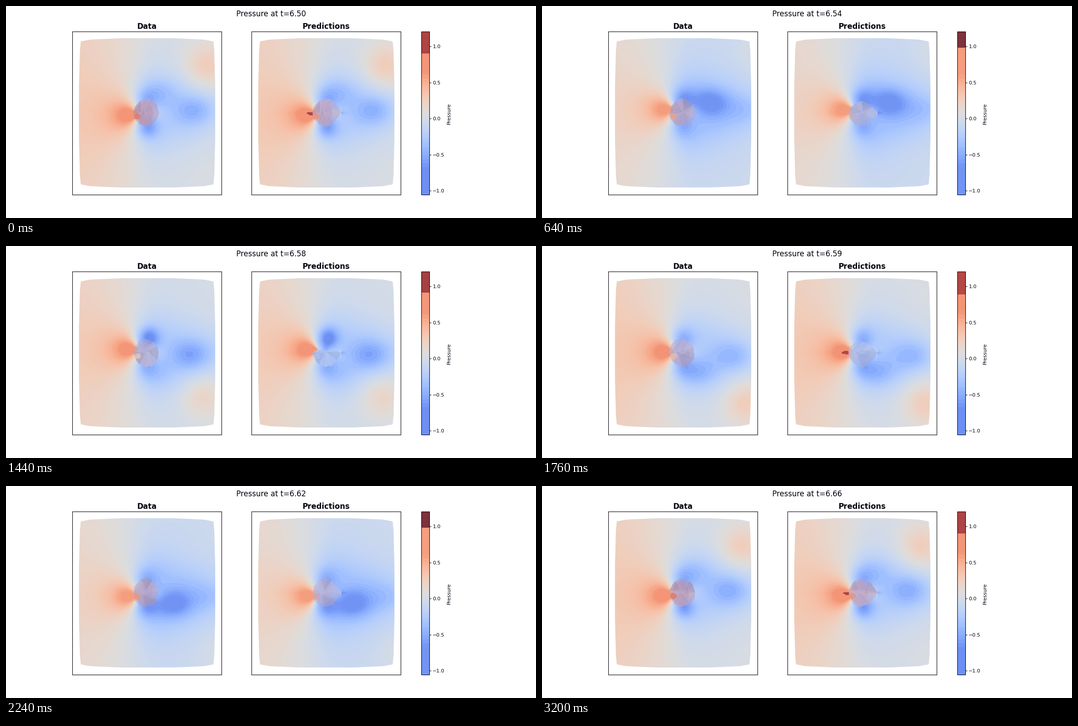
Animation, 1183 px wide and 473 px high, one loop 3.36 s. Source, as a matplotlib script:

```python
import numpy as np
import matplotlib.pyplot as plt
from matplotlib.animation import FuncAnimation
from matplotlib.colors import ListedColormap, to_rgb
from matplotlib.patches import Polygon

W, H, DPI = 1183, 473, 100
FRAMES, INTERVAL = 21, 160
VMIN, VMAX = -1.054, 1.208
PERIOD = 20.2          # frames per vortex shedding cycle
CX, CY = 313, 239      # cylinder centre
INK = "#08000f"

X, Y = np.meshgrid(np.arange(162, 469) + .5, np.arange(71, 407) + .5)
DX, DY = X - CX, Y - CY


def bump(x, centre, width):
    return np.exp(-((x - centre) / width)**2)


def mix(a, b, t):
    return (1 - t) * np.array(to_rgb(a)) + t * np.array(to_rgb(b))


def outline():
    """Mesh border: one quarter mirrored about both axes."""
    quarter = np.array([(60, 166.5), (127, 163.5), (148, 159.5), (150, 139), (152, 60)])
    right = np.vstack([quarter, quarter[::-1] * (1, -1)])
    return np.vstack([right, right[::-1] * (-1, 1)]) + (315, 238.5)


def make_cmap(i):
    """Coolwarm in coarse steps, with flat ends that drift twice per cycle."""
    u = (i - 2) % (PERIOD / 2) / (PERIOD / 2)
    rows = np.arange(57, 421)
    level = (421 - np.where(np.abs(rows - 240) > 65, rows // 9 * 9 + 4, rows)) / 364
    hot_edge = 155 - 14 * u
    cold_edge = 355 + 8 * u + 38 * bump(u, .45, .13)
    level = np.clip(level, (421 - cold_edge) / 364, (421 - hot_edge) / 364)
    colours = plt.get_cmap("coolwarm")(level)
    colours[rows < 88 + 22 * u, :3] = mix("#6e2d3a", "#be4a48", u)
    return ListedColormap(colours[::-1])


def steady():
    """Part of the pressure that does not change during the cycle."""
    r2 = DX**2 + DY**2 + 1
    drift = .09 - .10 * np.tanh((DX + 60) / 80)
    sides = -.40 * DY**2 / r2 / (1 + r2 / 65**2)
    sides *= .5 * (1 + np.tanh((DX + 14) / 25))
    wake = -.27 * np.exp(-((DX - 70) / 90)**2 - (DY / 65)**2)
    return drift + sides + wake


STEADY = steady()


def blob(y, cx, cy, sx, sy):
    return np.exp(-((X - cx) / sx)**2 - ((y - cy) / sy)**2)


def shed(age, y):
    """Vortex, trailing ridge and suction peak from one side of the cylinder."""
    total = np.zeros_like(X)
    age %= PERIOD
    for a in (age - PERIOD, age):
        strength = .48 * bump(a, 5, max(5 + .25 * a, 2))
        vx, vy = 343 + 7.9 * a, 218 + 30 * np.tanh((a - 4.3) / 4)
        total -= strength * (.85 * blob(y, vx, vy, 42, 31) + .15 * blob(y, vx, vy, 95, 80))
        total += .27 * bump(a, .3, 3.2) * blob(y, 446 + 8 * a, 135 - 7 * a, 48, 48)
    gap = (age - 7.5 + PERIOD / 2) % PERIOD - PERIOD / 2
    peak = bump(gap, 0, 2.7)
    return total - (.12 + .42 * peak) * blob(y, 310 + 12 * peak, 205, 22, 22)


def pressure(i):
    level = .06 * np.cos(4 * np.pi * (i - .5) / PERIOD)
    y0 = CY - 11 * np.sin(2 * np.pi * (i - 1.5) / PERIOD)
    cosine = np.maximum(297 - X, 0) / np.hypot(297 - X, Y - y0)
    front = .85 * cosine**1.5 / (1 + ((X - 283)**2 + (Y - y0)**2) / 42**2)
    return STEADY + level + front + shed(i, Y) + shed(i + PERIOD / 2, 2 * CY - Y)


def predicted(p):
    """Adds the kinks along the centre line at the nose and tail."""
    nose = np.maximum(284 - X, 0)
    off = np.abs(Y - 239)
    streak = .25 * np.exp(-nose / 10 - off / 2.5) + .04 * np.exp(-nose / 80 - off / 5)
    kink = np.where(X > 349, -.32, .25) * np.exp(-np.abs(X - 349) / 7 - off / 3)
    return p + np.where(X < 285, streak, 0) + kink


def ring(rng, cx, cy, rx, ry, n, jitter):
    ang = np.linspace(0, 2 * np.pi, n, endpoint=False) + rng.uniform(-.15, .15, n)
    rad = 1 + rng.uniform(-jitter, jitter, n)
    return np.column_stack([cx + rx * rad * np.cos(ang), cy + ry * rad * np.sin(ang)])


class Panel:
    def __init__(self, ax, title, is_model):
        self.ax, self.is_model = ax, is_model
        ax.set_title(title, fontsize=12, fontweight="bold", pad=4.3, color=INK)
        self.image = ax.imshow(X * 0, extent=(162, 469, 407, 71), aspect="auto",
                               vmin=VMIN, vmax=VMAX, interpolation="nearest")
        ax.set(xlim=(147.9, 481.3), ylim=(421, 56.8), xticks=[], yticks=[])
        self.image.set_clip_path(Polygon(outline(), transform=ax.transData))
        self.shapes = [ax.add_patch(Polygon([(0, 0), (1, 0), (0, 1)], lw=0))
                       for _ in range(8)]

    def draw(self, i, p, cmap):
        self.image.set_data(predicted(p) if self.is_model else p)
        self.image.set_cmap(cmap)
        self.draw_cylinder(i)

    def draw_cylinder(self, i):
        rng = np.random.default_rng(40 + i)
        rosy = .5 + .5 * np.cos(2 * np.pi * (i + 1.5) / PERIOD)
        if self.is_model:
            core, spot_colour = mix("#a6bcf0", "#be9fbb", rosy), mix("#aebfef", "#e39684", rosy)
            lift = bump(i, 7.5, 2.8)
        else:
            core, spot_colour = mix("#b2aad0", "#b894b0", rosy), mix("#e8c4b0", "#dd7a68", rosy)
            lift = 0
        hull = ring(rng, 313, 238, 28.5, 32, 12, .06)
        if self.is_model:
            hull[0] = (349, 238)
        parts = [(hull, core, .5), (ring(rng, 309, 240, 21, 26, 9, .12), core, .6)]
        for k in range(5):
            a = rng.integers(12) + np.arange(3)
            centre = (309, 238) + rng.uniform(-9, 9, 2)
            tint = core * .88 if k % 2 else core + (1 - core) * .25
            parts.append((np.vstack([hull[a % 12], centre]), tint, .32))
        parts.append((ring(rng, 294, 246, 8, 7, 7, .2), spot_colour, .85))
        for shape, (pts, colour, alpha) in zip(self.shapes, parts):
            x, y = pts.T
            y = np.where(y < 238, 238 + (y - 238) * (1 - lift), y)
            shape.set_xy(np.column_stack([x, y]))
            shape.set_facecolor((*colour, alpha))


fig, axes = plt.subplots(1, 2, figsize=(W / DPI, H / DPI), dpi=DPI, facecolor="white")
heading = fig.suptitle("", fontsize=12, color=INK)
panels = [Panel(axes[0], "Data", False), Panel(axes[1], "Predictions", True)]

bar = fig.colorbar(panels[0].image, ax=list(axes), ticks=np.arange(-1, 1.1, .5))
bar.ax.tick_params(labelsize=8, length=3, pad=2, labelcolor=INK)
fig.text(989 / W, 1 - 240.5 / H, "Pressure", fontsize=8, rotation=90,
         ha="center", va="center", color=INK)


def update(i):
    p, cmap = pressure(i), make_cmap(i)
    for panel in panels:
        panel.draw(i, p, cmap)
    heading.set_text(f"Pressure at t={6.504 + .008 * i:.2f}")
    return []


anim = FuncAnimation(fig, update, frames=FRAMES, interval=INTERVAL, repeat=True)
plt.show()
```
